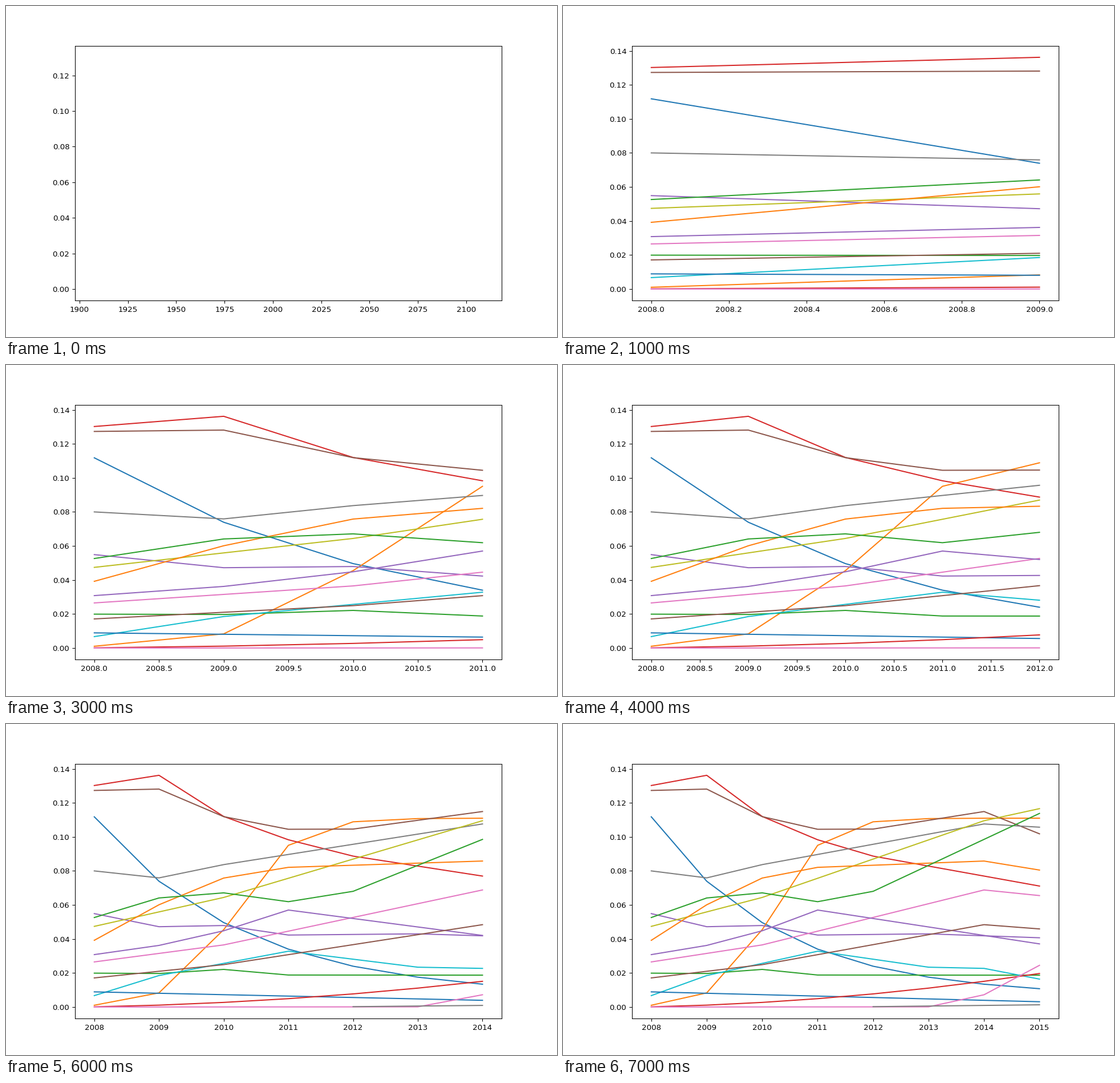
These frames come from a looping animation (966x580 px, 8000 ms). A matplotlib script:

```python
import matplotlib.pyplot as plt
import numpy as np
from matplotlib.animation import FuncAnimation

t = np.arange(8)  # years since the first one
FIRST_YEAR = 2008


def path(*points):
    """Straight runs between (year, percent) turning points."""
    years, percents = zip(*points)
    return np.interp(t, years, percents, left=np.nan)


def decay(start, floor, ratio):
    return floor + (start - floor) * ratio ** t


def s_curve(top, middle, steepness):
    return top / (1 + np.exp(-steepness * (t - middle)))


# Shares in percent, in the order of the colour cycle.
trends = [
    decay(11.18, 0.6, 0.642),
    s_curve(11.1, 2.17, 2.15),
    path((0, 1.99), (1, 1.97), (2, 2.21), (3, 1.88), (7, 1.87)),
    path((0, 13.02), (1, 13.62), (2, 11.2), (3, 9.83), (4, 8.87), (7, 7.11)),
    path((0, 5.49), (1, 4.72), (2, 4.79), (3, 4.23), (5, 4.3), (7, 4.07)),
    path((0, 12.73), (1, 12.81), (2, 11.19), (3.4, 10.15), (6, 11.49), (7, 10.18)),
    path((0, 2.65), (2, 3.65), (6, 6.88), (7, 6.55)),
    path((0, 8.0), (1, 7.59), (2, 8.37), (6, 10.76), (7, 10.57)),
    path((0, 4.74), (2, 6.44), (6, 10.95), (7, 11.66)),
    path((0, 0.67), (1, 1.85), (3, 3.28), (5, 2.34), (6, 2.27), (7, 1.64)),
    path((0, 0.89), (7, 0.31)),
    path((0, 3.92), (1, 6.01), (2, 7.58), (3, 8.21), (6, 8.58), (7, 8.05)),
    path((0, 5.26), (1, 6.41), (2, 6.71), (3, 6.19), (4, 6.8), (7, 11.38)),
    0.01 + 0.07 * t + 0.03 * t ** 2,
    path((0, 3.08), (1, 3.62), (2, 4.48), (3, 5.7), (7, 3.71)),
    path((0, 1.71), (2, 2.49), (6, 4.84), (7, 4.59)),
    path((0, 0), (5, 0.01), (6, 0.72), (7, 2.45)),
    path((4, 0.02), (7, 0.13)),
]
shares = np.transpose(trends) / 100

fig, ax = plt.subplots(figsize=(10, 6.0042), dpi=96.6)  # 966 x 580 pixels


def draw(step):
    """Redraw every line up to the current year; the axes rescale to fit."""
    ax.clear()
    shown = step + 1
    return ax.plot(FIRST_YEAR + t[:shown], shares[:shown])


anim = FuncAnimation(fig, draw, frames=len(t), init_func=lambda: draw(0),
                     interval=1000, repeat=True)
plt.show()
```
